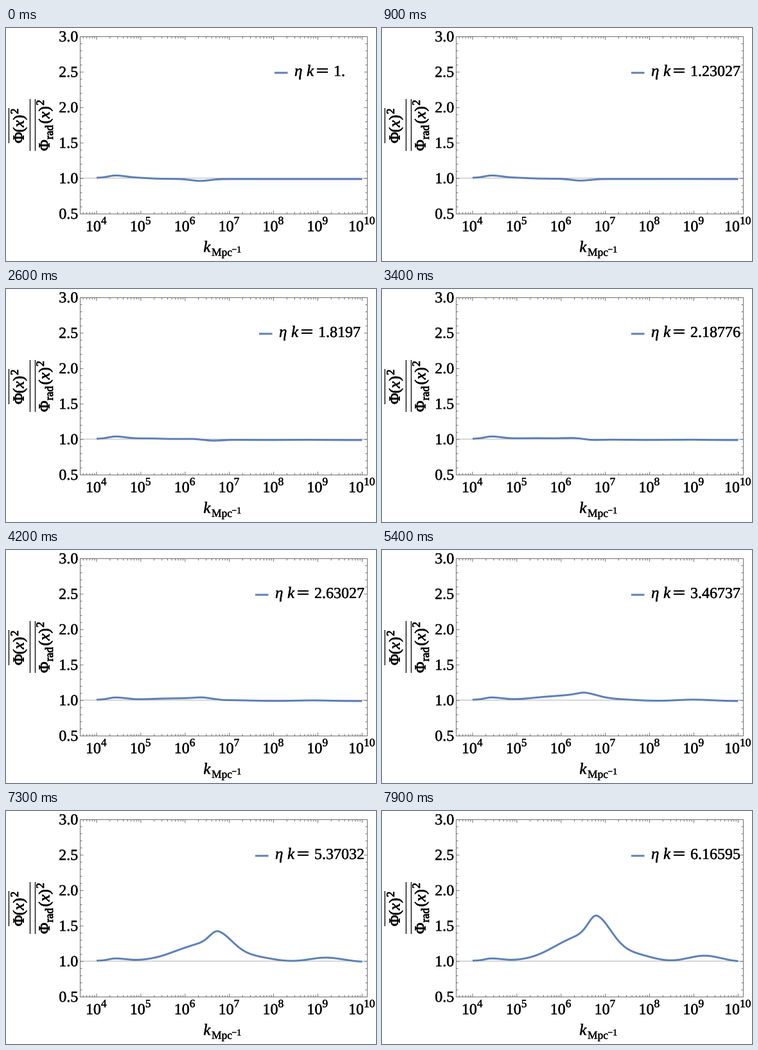
Write a matplotlib script that moves like this. It is 576x364 px and loops after 8000 ms.

```python
import numpy as np
import matplotlib.pyplot as plt
from matplotlib.animation import FuncAnimation
from matplotlib.patheffects import withStroke

W, H, DPI = 576, 364, 100
PT = 72 / DPI                      # points per pixel
BLUE, GRAY = "#5e81b5", "#6e6e6e"
LEFT, RIGHT, TOP, BOTTOM = 115.5, 562.5, 13.5, 290.5
DECADE, X4 = 68.9, 141             # pixels per decade, place of 10^4
UNIT, Y1 = 110.8, 234.9            # pixels per unit, place of 1.0
BIG, SMALL, TINY = 24, 17.5, 14
FRAMES, STEP = 80, 100

fig = plt.figure(figsize=(W / DPI, H / DPI), dpi=DPI, facecolor="white")
ax = fig.add_axes([0, 0, 1, 1])
ax.set_xlim(0, W)
ax.set_ylim(H, 0)
ax.axis("off")


def text(x, y, s, size=BIG, italic=False, ha="left", rotation=0,
         family="Liberation Serif", weight=0.35):
    stroke = withStroke(linewidth=weight * PT, foreground="black")
    return ax.text(x, y, s, fontsize=size * PT, family=family,
                   style="italic" if italic else "normal", color="black",
                   ha=ha, va="baseline", rotation=rotation,
                   rotation_mode="anchor", path_effects=[stroke])


def line(xs, ys, color=GRAY, width=1, z=1):
    return ax.plot(xs, ys, color=color, lw=width * PT, zorder=z, snap=False,
                   solid_capstyle="butt")[0]


# Frame, ticks and tick labels
line([LEFT, RIGHT], [234.5, 234.5], "#b4b4b4", 1, 0)
line([LEFT, RIGHT, RIGHT, LEFT, LEFT], [TOP, TOP, BOTTOM, BOTTOM, TOP])


def x_tick(x, size):
    line([x, x], [BOTTOM, BOTTOM - size])
    line([x, x], [TOP, TOP + size])


def y_tick(y, size):
    line([LEFT, LEFT + size], [y, y])
    line([RIGHT, RIGHT - size], [y, y])


for power in range(3, 11):
    for digit in range(1, 10):
        x = X4 + DECADE * (power + np.log10(digit) - 4)
        if LEFT < x < RIGHT:
            x_tick(x, 5 if digit == 1 else 3)
    if power > 3:
        exponent = str(power)
        x = X4 + DECADE * (power - 4)
        start = x - (BIG + SMALL / 2 * len(exponent)) / 2 - 0.7
        text(start, 317.5, "10")
        text(start + BIG, 306.5, exponent, SMALL)

for tenth in range(5, 31):
    y = BOTTOM - UNIT * (tenth / 10 - 0.5)
    y_tick(y, 5 if tenth % 5 == 0 else 3)
    if tenth % 5 == 0:
        text(112.3, y + 7.5, f"{tenth / 10:.1f}", ha="right")

# Axis labels
text(307.3, 350, "k", 25, italic=True)
text(320, 356, "Mpc", SMALL)
text(351.3, 350.5, "\u22121", TINY)


def up(x, y, s, size=BIG, italic=False):
    text(x, y, s, size, italic, rotation=90, weight=0.8)


def squared(x, y):
    up(x, y, "(")
    up(x, y - 8.2, "x", italic=True)
    up(x, y - 19.2, ")")
    up(x - 8.5, y - 28.5, "2", SMALL)


up(27.5, 180, "\u03a6")
squared(27.5, 163)
up(67.5, 192, "\u03a6")
up(73, 174, "rad", SMALL)
squared(67.5, 149.5)
for x, y0, y1 in [(4, 125, 180), (37, 111, 192), (45, 111, 192)]:
    line([x + 0.5, x + 0.5], [y0, y1], "black", 1.3)


# Curve
def hump(x, centre, left, right):
    """Bell with its own width on either side."""
    d = x - centre
    return np.exp(-0.5 * (d / np.where(d < 0, left, right)) ** 2)


def ratio(log_k, log):
    """Height of the curve; all but the first hump drift with log10(eta k)."""
    u = log_k + 0.79 - log
    grow = 10 ** (log - 0.79)
    step = 1 / (1 + np.exp(-(u - 5.97) / 0.12))
    base = 1.008 - 0.018 * step + 0.032 * hump(log_k, 4.43, 0.16, 0.23)
    dip = 0.028 * (1 - log) * hump(u, 7.12, 0.22, 0.22)
    broad = 0.37 * hump(u, 6.5, 0.6, 0.6) + 0.09 * hump(u, 9.24, 0.38, 0.38)
    peak = 0.33 * hump(u, 6.82, 0.19, 0.33) + 0.07 * hump(u, 7.75, 0.38, 0.38)
    return base - dip + broad * grow ** 2.6 + peak * grow ** 3.3


log_k = np.linspace(4, 10, 400)
xs = X4 + DECADE * (log_k - 4)
curve = line(xs, xs * 0 + Y1, BLUE, 3, 3)

# Legend, centred as one group
swatch = line([0, 0], [70, 70], BLUE, 3, 3)
number = text(0, 75, "")
legend = [(31, text(0, 75, "\u03b7", 25, italic=True)),
          (50, text(0, 75, "k", 25, italic=True)),
          (63, text(0, 75, "=", 27, family="DejaVu Sans", weight=0)),
          (92, number)]


def update(i):
    log = i / 100
    curve.set_ydata(Y1 - UNIT * (ratio(log_k, log) - 1))

    label = f"{10 ** log:.6g}"
    if "." not in label:
        label += "."
    number.set_text(label)
    width = 92 + BIG / 2 * (len(label) - 1) + BIG / 4
    start = 473 - width / 2
    swatch.set_xdata([start, start + 20.5])
    for offset, part in legend:
        part.set_x(start + offset)
    return [curve, swatch] + [part for _, part in legend]


anim = FuncAnimation(fig, update, frames=FRAMES, interval=STEP,
                     init_func=lambda: update(0), repeat=True, repeat_delay=0)
plt.show()
```
